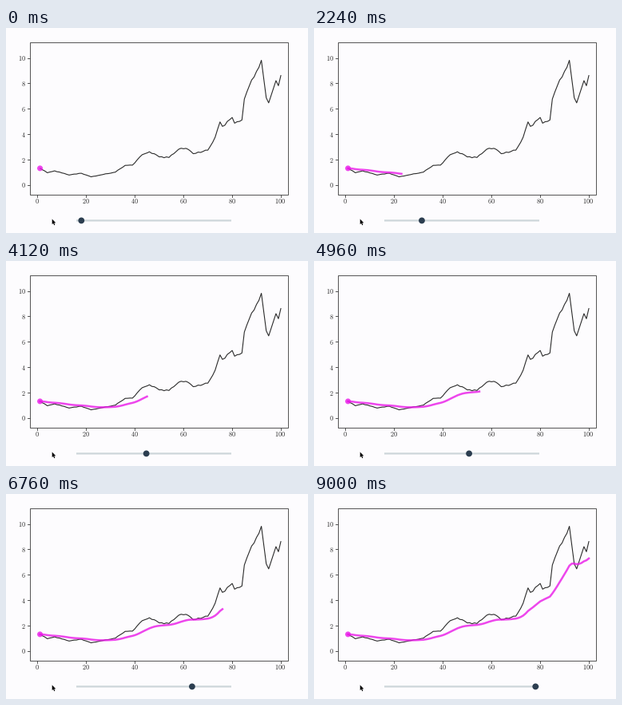
Write a matplotlib script that moves like this. It is 378 px wide and 257 px high and loops after 9.04 s.

```python
import matplotlib.pyplot as plt
import numpy as np
from matplotlib.animation import FuncAnimation
from matplotlib.patches import Circle, Polygon, Rectangle

plt.rcParams["mathtext.fontset"] = "cm"

W, H, DPI = 378, 257, 100
FRAMES, INTERVAL = 226, 40
START, STEP = 340, 85.5          # ms before the first step, ms per step
DAYS = 100
SMOOTHING = 0.1
PAPER, INK, AXIS = "#fdfcfe", "#2a2a2a", "#444444"
PINK, ALPHA = "#ea18e8", 0.8

# Turning points of the price as (day, value)
TURNS = [(1, 1.35), (4, 1.0), (7, 1.15), (13, 0.82), (18, 0.96), (22, 0.68),
         (32, 1.05), (36, 1.58), (39, 1.6), (43, 2.42), (46, 2.65),
         (50, 2.25), (54, 2.2), (58, 2.85), (61, 2.92), (64, 2.5),
         (70, 2.78), (73, 3.8), (75, 5.0), (76, 4.65), (80, 5.35),
         (81, 4.9), (84, 5.15), (85, 6.8), (88, 8.3), (92, 9.85),
         (94, 6.9), (95, 6.5), (98, 8.25), (99, 7.85), (100, 8.65)]


def price_series():
    days = np.arange(1, DAYS + 1)
    turn_days, values = zip(*TURNS)
    jitter = np.random.default_rng(4).uniform(-0.02, 0.02, DAYS)
    jitter[np.isin(days, turn_days)] = 0
    return days, np.interp(days, turn_days, values) * (1 + jitter)


def moving_average(values, a):
    out = [values[0]]
    for v in values[1:]:
        out.append(out[-1] + a * (v - out[-1]))
    return np.array(out)


def px(day):
    return 39.5 + 3.045 * day


def py(value):
    return 197.4 - 15.93 * value


def pt(pixels):
    return pixels * 72 / DPI


fig = plt.figure(figsize=(W / DPI, H / DPI), dpi=DPI, facecolor=PAPER)
ax = fig.add_axes([0, 0, 1, 1])
ax.set_xlim(0, W)
ax.set_ylim(H, 0)
ax.axis("off")

# Chart frame, ticks and labels
ax.add_patch(Rectangle((30, 18), 323, 191, fill=False, ec=AXIS, lw=pt(0.9)))
for day in range(0, DAYS + 1, 20):
    ax.plot([px(day) - 0.5] * 2, [209, 212.3], color=AXIS, lw=pt(0.9))
    ax.text(px(day) - 0.5, 216.7, f"${day}$", size=pt(8.3), color=INK,
            ha="center", va="center")
for value in range(0, 11, 2):
    ax.plot([27, 30], [py(value) - 0.5] * 2, color=AXIS, lw=pt(0.9))
    ax.text(25, py(value), f"${value}$", size=pt(8.3), color=INK,
            ha="right", va="center")

# Price series and its running average
days, prices = price_series()
xs, trend = px(days), py(moving_average(prices, SMOOTHING))
ax.plot(xs, py(prices), color=INK, lw=pt(1.1), solid_joinstyle="round")
line, = ax.plot([], [], color=PINK, alpha=ALPHA, lw=pt(2.5), zorder=3,
                solid_capstyle="projecting", solid_joinstyle="round")
ax.add_patch(Circle((xs[0], trend[0]), 3.5, fc=PINK, ec="none",
                    alpha=ALPHA, zorder=4))

# Slider
ax.add_patch(Rectangle((88, 240.3), 194, 2.2, fc="#cdd6da", ec="none",
                       snap=False))
knob = Circle((94.3, 241.4), 3.9, fc="#2c3e50", ec="none", zorder=5)
ax.add_patch(knob)

# Mouse pointer
arrow = np.array([(0, 0), (0, 6.6), (1.5, 5.3), (2.6, 7.8),
                  (3.6, 7.3), (2.6, 4.9), (4.6, 4.8)])
ax.add_patch(Polygon(arrow + (57.7, 239.5), fc="black", ec="none"))


def update(i):
    step = int(np.clip((i * INTERVAL - START) / STEP, 0, DAYS - 1))
    shown = step + 1 if step else 0
    line.set_data(xs[:shown], trend[:shown])
    knob.center = (94.3 + 1.848 * step, 241.4)
    return line, knob


anim = FuncAnimation(fig, update, frames=FRAMES, interval=INTERVAL,
                     repeat=True, repeat_delay=0, blit=False)
plt.show()
```
